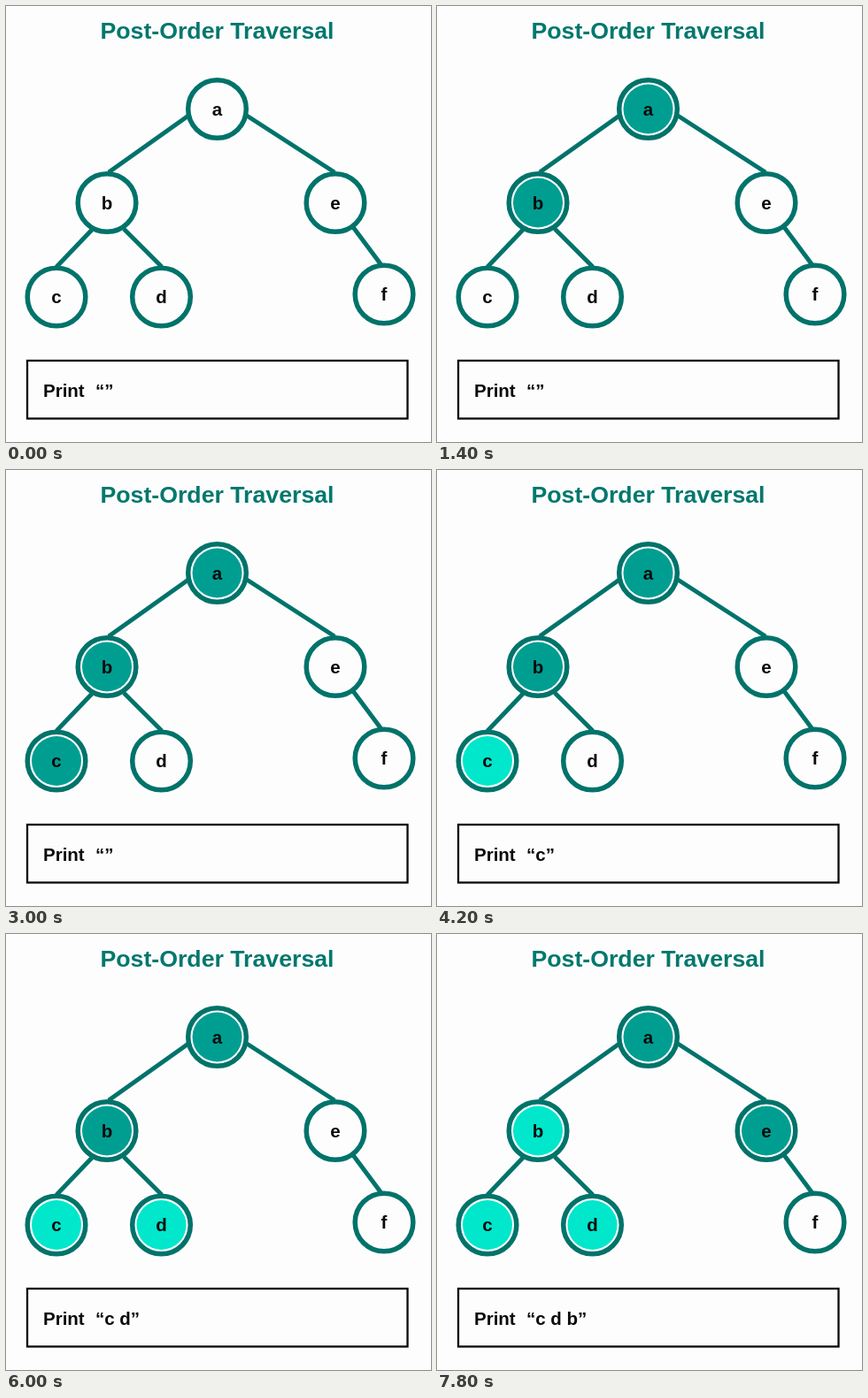
Write an HTML page that moves like this. It is 480 by 493 pixels and loops after 8 s.

```html
<!DOCTYPE html>
<html lang="en">
<head>
<meta charset="utf-8">
<title>Post-Order Traversal</title>
<style>
  html, body { margin: 0; width: 100%; height: 100%; overflow: hidden; background: #fdfdfe; }
  svg { display: block; width: 100%; height: 100%; }
  text { font: bold 20.5px "Liberation Sans", Arial, sans-serif; fill: #0b0b0b; }
  .title { font-size: 26.7px; fill: #00786d; }
  .title, .node text { text-anchor: middle; }
  .edge, .ring { stroke: #00736a; stroke-width: 5.5; }
  .ring { fill: #fdfdfe; }
  .edge { stroke-width: 5; }
</style>
</head>
<body>
<svg viewBox="0 0 480 493">
  <text class="title" x="238.5" y="37">Post-Order Traversal</text>
  <g id="tree"></g>
  <rect x="24" y="401" width="429.5" height="65.5" fill="none" stroke="#0b0b0b" stroke-width="2.3"/>
  <text x="42" y="441.5">Print</text>
  <text id="output" x="101" y="441.5"></text>
</svg>
<script>
const LOOP = 8000, FIRST_STEP = 400, STEP = 1000;
const VISITED = '#009e91', PRINTED = '#00e7cc';

const nodes = {
  a: [238.5, 116.5], b: [114, 222.5], c: [57, 329],
  d: [175.5, 329], e: [372, 222.5], f: [427, 326]
};
const edges = [
  [206, 124, 116, 188], [272, 124, 371, 188],
  [98, 252, 57, 295], [133, 252, 176, 295], [392, 250, 424, 293]
];
// A node's first appearance visits it, its second prints it.
const steps = ['a', 'b', 'c', 'c', 'd', 'd', 'b', 'e'];

const tree = document.getElementById('tree');
const output = document.getElementById('output');

tree.innerHTML =
  edges.map(([x1, y1, x2, y2]) =>
    `<line class="edge" x1="${x1}" y1="${y1}" x2="${x2}" y2="${y2}"/>`).join('') +
  Object.entries(nodes).map(([name, [x, y]]) =>
    `<g class="node" transform="translate(${x} ${y})">
      <circle class="ring" r="32.8"/>
      <circle id="fill-${name}" r="28"/>
      <text y="7.3">${name}</text>
    </g>`).join('');

function render(time) {
  const count = Math.floor((time - FIRST_STEP) / STEP) + 1;
  const visited = new Set();
  const printed = [];
  for (const name of steps.slice(0, count)) {
    if (visited.has(name)) printed.push(name);
    visited.add(name);
  }
  for (const name in nodes) {
    const color = printed.includes(name) ? PRINTED : visited.has(name) ? VISITED : 'none';
    document.getElementById('fill-' + name).setAttribute('fill', color);
  }
  output.textContent = `“${printed.join(' ')}”`;
}

const start = performance.now();
function tick() {
  render((performance.now() - start) % LOOP);
  requestAnimationFrame(tick);
}
tick();
</script>
</body>
</html>
```
